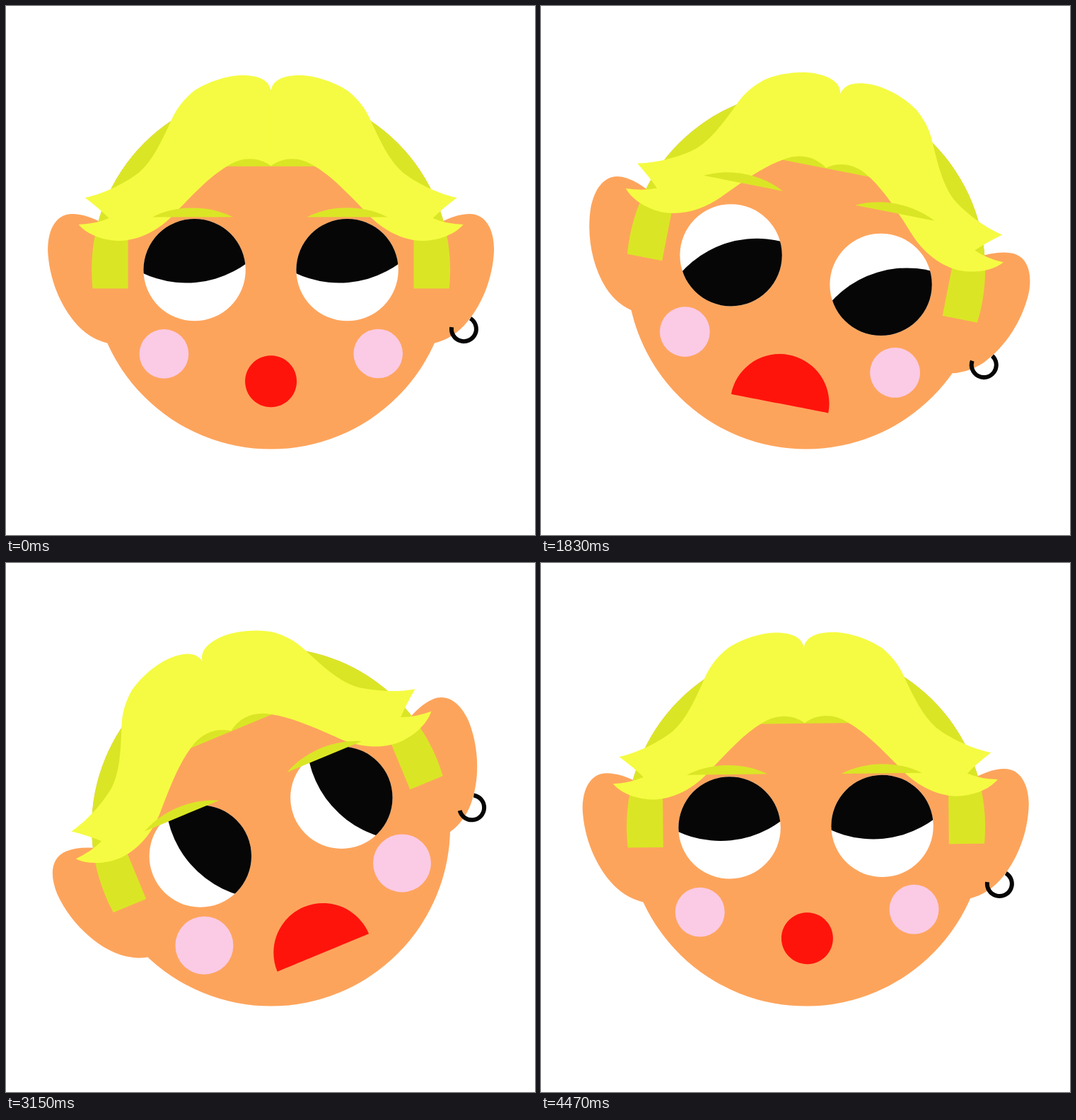
These frames come from a looping animation (748x748 px, 4.5 s). An HTML page:

```html
<!DOCTYPE html>
<html lang="en">
<head>
<meta charset="utf-8">
<title>Nodding face</title>
<style>
  html, body { margin: 0; height: 100%; overflow: hidden; background: #fff; }
  svg { display: block; width: 100vw; height: 100vh; }
</style>
</head>
<body>
<svg viewBox="-374.6 -373.1 748 748">
  <defs>
    <clipPath id="skull"><circle r="253.5"/></clipPath>
    <clipPath id="eyeball"><circle r="72.2"/></clipPath>
    <g id="eye">
      <circle r="72.2" fill="#fff"/>
      <g clip-path="url(#eyeball)"><circle class="pupil" cx="126" r="144" fill="#060606"/></g>
    </g>
    <path id="brow" fill="#dae625" d="M-57 0C-23 -17.5 23 -17.5 57 0z"/>
    <path id="ear" fill="#fda45c" d="M-234 -64Q-261 -79 -281 -79C-304 -79 -315.5 -57 -315.5 -28C-314 12 -298 52 -273 79Q-252 101 -224 105L-174 27z"/>
    <path id="lock" fill="#f5fb42" d="M0 -253C-2 -268 -17 -275 -41 -275C-62 -275 -92 -265 -110 -252C-128 -237 -136 -223 -142 -209C-155 -181 -167 -155 -186 -138C-202 -125 -234 -108 -263 -102Q-243 -87 -229 -73Q-247 -65 -272 -64C-259 -49 -236 -41 -212 -41C-179 -43 -152 -61 -131 -85C-108 -109 -85 -133 -61 -147C-41 -160 -18 -160 0 -147H1V-251z"/>
  </defs>
  <g id="head">
    <use href="#ear"/>
    <use href="#ear" transform="scale(-1 1)"/>
    <path d="M282 68.7A17.5 17.5 0 1 1 255.500 81" fill="none" stroke="#060606" stroke-width="6"/>
    <circle r="253.5" fill="#fda45c"/>
    <path clip-path="url(#skull)" fill="#dae625" d="M-264 -280H264V26.500H202V-103L146 -146.300H-146L-202 -103V26.500H-264z"/>
    <use href="#lock"/>
    <use href="#lock" transform="scale(-1 1)"/>
    <use href="#eye" x="-108"/>
    <use href="#eye" x="108"/>
    <use id="leftBrow" href="#brow" x="-110.5"/>
    <use id="rightBrow" href="#brow" x="108"/>
    <circle class="cheek" cx="-151.2" cy="118.8" fill="#fbcae5"/>
    <circle class="cheek" cx="151.6" cy="118.4" fill="#fbcae5"/>
    <path id="mouth" fill="#ff140c"/>
  </g>
</svg>
<script>
const LOOP = 4500;
const $ = id => document.getElementById(id);
const pupil = document.querySelector('.pupil');
const cheeks = document.querySelectorAll('.cheek');
const mix = (a, b, k) => a + (b - a) * k;

// Eases from 0 to 1 between two times.
function ramp(t, from, to) {
  const x = Math.min(1, Math.max(0, (t - from) / (to - from)));
  return x * x * (3 - 2 * x);
}

// A quick turn, then a slow drift over the last few degrees.
const swing = (t, from) => 0.93 * ramp(t, from, from + 360) + 0.07 * ramp(t, from + 360, from + 1260);

function gaze(t) {
  const peak = 1750;
  const x = t < peak ? (t / peak) ** 1.73 : (LOOP - t) / (LOOP - peak);
  return mix(-95.2, 62.3, (1 - Math.cos(Math.PI * x)) / 2);
}

// Blends a circle (0) into a half disc with a flat base (1).
function mouthPath(k) {
  const r = 36.5, arc = 0.5523, center = 157.6;
  const top = center - mix(r, 35, k), base = center + mix(r, 35, k);
  const width = mix(r, 70, k), side = center + 35 * k;
  const bend = arc * width, low = mix(arc * r, 35, k);
  const half = s => `M0 ${top}C${s * bend} ${top} ${s * width} ${side - bend} ${s * width} ${side}` +
    `C${s * width} ${mix(side + arc * r, base, k)} ${s * low} ${base} 0 ${base}`;
  return half(1) + half(-1);
}

function draw(t) {
  const raise = ramp(t, 1400, 1760), glare = ramp(t, 2730, 3010);
  const relax = ramp(t, 3400, 3800), reset = ramp(t, 4200, LOOP);
  const tilt = -14.8 * swing(t, 0) + 27.8 * swing(t, 1400) - 38 * swing(t, 2650) + 25 * reset;
  const brow = -74.6 - 28.5 * raise + 40.5 * glare;

  $('head').setAttribute('transform', `rotate(${tilt})`);
  pupil.setAttribute('transform', `rotate(${gaze(t)})`);
  $('leftBrow').setAttribute('y', brow - 40.5 * relax + 28.5 * reset);
  $('rightBrow').setAttribute('y', brow - 10 * relax - 2 * reset);
  cheeks.forEach(c => c.setAttribute('r', 34.8 + 0.6 * raise + 5.6 * glare - 6.2 * reset));
  $('mouth').setAttribute('d', mouthPath(ramp(t, 1400, 1700) - ramp(t, 3400, 3700)));
}

const start = performance.now();
function tick() {
  draw((performance.now() - start) % LOOP);
  requestAnimationFrame(tick);
}
tick();
</script>
</body>
</html>
```
